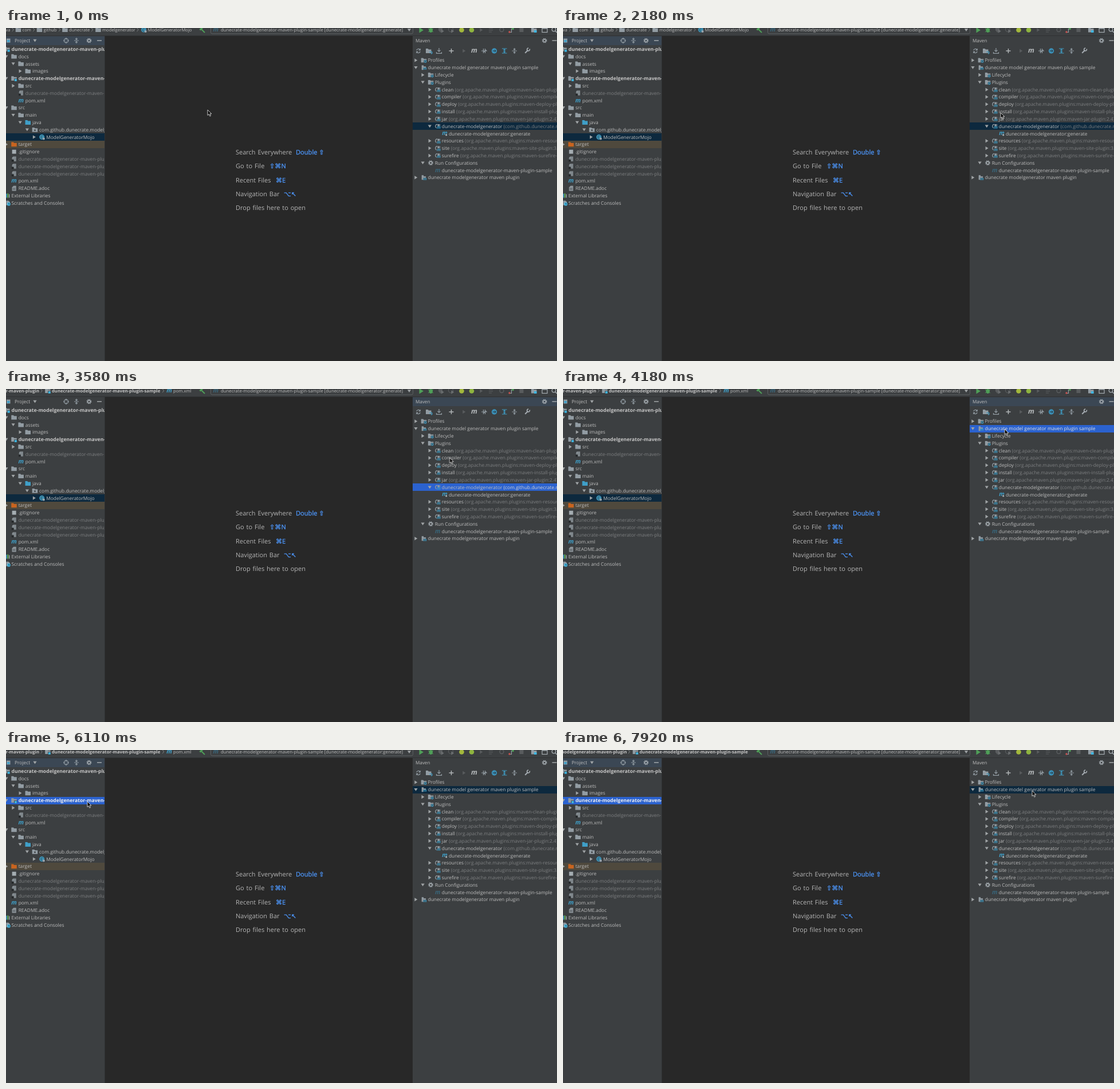
An HTML page for the animation above (8 s loop, 962 by 582 pixels).

```html
<!DOCTYPE html>
<html lang="en">
<head>
<meta charset="utf-8">
<title>IDE plugin walkthrough</title>
<style>
html, body { margin: 0; width: 100%; height: 100%; overflow: hidden; background: #282828; }
svg { display: block; width: 962px; height: 582px; }
text {
  font: 8.4px "Open Sans", "DejaVu Sans", sans-serif;
  fill: #bdbdbd; white-space: pre;
  text-rendering: geometricPrecision;
}
.b { font-weight: 700; font-size: 8.65px; fill: #c6c6c6; }
.dim { fill: #7d7f80; }
.nav { font-size: 7.65px; }
.nav.b { font-size: 7.7px; }
.hint { font-size: 11px; word-spacing: 1px; fill: #b4b4b4; }
.key { font-size: 11.1px; fill: #4d96fa; stroke: #4d96fa; stroke-width: .3px; }
.m { font-style: italic; font-weight: 700; fill: #3f9fc8; }
.lit { animation: lit 8s step-end infinite; }
.litRoot { animation: litRoot 8s step-end infinite; }
.litSample { animation: litSample 8s step-end infinite; }
#cursor { animation: move 8s step-end infinite; }
@keyframes lit {
  0%, 52.25%, 100% { fill: #7d7f80; }
  38.5% { fill: #d4d4d4; }
}
@keyframes litRoot {
  0%, 76.375%, 100% { fill: #bdbdbd; }
  52.25% { fill: #e2e2e2; }
}
@keyframes litSample {
  0%, 100% { fill: #c6c6c6; }
  76.375% { fill: #f0f0f0; }
}
@keyframes move {
  0% { transform: translate(352px, 143px); }
  1.75% { transform: translate(349px, 139px); }
  3.625% { transform: translate(510px, 162px); }
  6.625% { transform: translate(690px, 187px); }
  12.25% { transform: translate(690px, 187px); animation-timing-function: steps(7, start); }
  25.375% { transform: translate(735px, 91px); animation-timing-function: steps(2, start); }
  29.125% { transform: translate(764px, 148px); animation-timing-function: steps(4, start); }
  36.625% { transform: translate(778px, 170px); }
  42.25% { transform: translate(778px, 170px); animation-timing-function: steps(4, start); }
  50.58% { transform: translate(771px, 70px); }
  59.75% { transform: translate(771px, 70px); animation-timing-function: steps(2, start); }
  63.25% { transform: translate(245px, 95px); }
  65.25% { transform: translate(245px, 95px); animation-timing-function: steps(5, start); }
  74.46% { transform: translate(142px, 90px); }
  78.375% { transform: translate(142px, 90px); animation-timing-function: steps(3, start); }
  84.375% { transform: translate(645px, 127px); }
  86.125% { transform: translate(735px, 106px); }
  88% { transform: translate(735px, 106px); animation-timing-function: steps(4, start); }
  95.33% { transform: translate(798px, 75px); }
  99%, 100% { transform: translate(819px, 71px); }
}
</style>
</head>
<body>
<svg id="stage" viewBox="0 0 962 582"></svg>
<script>
const org = 'dunecrate';
const base = org + '-modelgenerator';
const project = base + '-maven-plugin';
const sample = project + '-sample';
const GREY = '#929ca3', BLUE = '#3f9fc8', GREEN = '#4f9f58', OFF = '#595c5e';
const DARK = '#0d293e', BRIGHT = '#2b62cf';
const PITCH = 12.81;
const NAV_Y = 3;

let css = '';
const rect = (x, y, w, h, fill, more = '') =>
  `<rect x="${x}" y="${y}" width="${w}" height="${h}" fill="${fill}" ${more}/>`;
const shape = (d, fill) => `<path d="${d}" fill="${fill}"/>`;
const line = (d, color = GREY, w = 1.2) =>
  `<path d="${d}" fill="none" stroke="${color}" stroke-width="${w}"/>`;
const dot = (x, y, r, fill) => `<circle cx="${x}" cy="${y}" r="${r}" fill="${fill}"/>`;
const ring = (x, y, r, color = GREY, w = 1.2, more = '') =>
  `<circle cx="${x}" cy="${y}" r="${r}" fill="none" stroke="${color}" stroke-width="${w}" ${more}/>`;
const text = (x, y, s, cls = '', more = '') =>
  `<text x="${x}" y="${y + 3}" class="${cls}" ${more}>${s}</text>`;

// Show content only from a to b milliseconds of the loop.
function during(a, b, content) {
  const name = `on${a}to${b}`;
  if (!css.includes(name + '{'))
    css += `@keyframes ${name}{0%{opacity:0}${a / 80}%{opacity:1}${b / 80}%{opacity:0}100%{opacity:0}}`;
  return `<g style="animation:${name} 8s step-end infinite">${content}</g>`;
}

// Icons take their left edge and vertical centre.
const folder = (x, y, c = GREY) => shape(`M${x} ${y - 3.9}h3.7l1.2 1.4h4.6v6.4h-9.5z`, c);
const icons = {
  folder,
  java: (x, y) => folder(x, y, BLUE),
  out: (x, y) => folder(x, y, '#c8641f'),
  pack: (x, y) => folder(x, y) + dot(x + 4.8, y + .9, 1.4, '#3c3f41'),
  module: (x, y) => folder(x, y) + rect(x + 4.8, y + .2, 5.2, 4.6, '#3c3f41') + rect(x + 5.6, y + 1, 4, 3.8, '#40b6e0'),
  file: (x, y) => shape(`M${x + 4} ${y - 4.5}h4.5v8.5h-7.2v-5.8z`, '#80888d') +
    shape(`M${x + 1.2} ${y - 2.4}l2.2-2.1v2.1z`, '#a5adb2') + rect(x + .6, y + .8, 3.8, 3.8, '#25282a'),
  doc: (x, y) => shape(`M${x + 4} ${y - 4.5}h4.5v9h-7.2v-6.3z`, '#8d959a') +
    line(`M${x + 2.5} ${y}h4.6m-4.6 2h4.6`, '#45494c', .8),
  m: (x, y) => text(x, y, 'm', 'm', 'style="font-size:10.5px"'),
  mDim: (x, y) => text(x, y, 'm', 'm', 'style="font-size:10.5px;fill:#396579"'),
  cls: (x, y) => dot(x + 4.8, y, 4.5, '#3d91b3') +
    text(x + 2.4, y - .2, 'C', '', 'style="font-size:7px;fill:#22353f"') +
    dot(x + 8, y + 3, 2, '#9aa7b0'),
  square: (x, y) => rect(x + 1.4, y - 3.5, 7, 7, '#a5adb2'),
  libs: (x, y) => rect(x, y - 3.5, 1.6, 7, BLUE) + rect(x + 2.3, y - 4, 1.6, 7.5, '#62b543') + rect(x + 4.6, y - 2.6, 1.6, 6.1, GREY),
  scratch: (x, y) => shape(`M${x} ${y - 4.2}h4l2.6 2.4v5.6h-6.6z`, GREY) + dot(x + 4.6, y + 1.8, 2.9, '#40b6e0') +
    line(`M${x + 4.6} ${y}v2h1.6`, '#263238', .8),
  mvn: (x, y) => shape(`M${x + 1} ${y - 4}h3.4v2h4v2.4h-4.6v3.6h-2.8z`, GREY) +
    text(x + 3.6, y + 1.2, 'm', 'm', 'style="font-size:7px"'),
  set: (x, y) => folder(x, y) + dot(x + 7.4, y + 2, 2.8, '#3c3f41') + ring(x + 7.4, y + 2, 1.7, BLUE, 1.2),
  plug: (x, y) => line(`M${x + 4} ${y - 3.4}a3.4 3.4 0 0 0-1.4 6.4`, GREY, 1.2) +
    rect(x + 4.4, y - 3.6, 3.4, 3.6, GREY) + line(`M${x + 7.8} ${y - 2.8}h1.8m-1.8 1.8h1.8`, GREY, .8) +
    text(x + 3.2, y + 1.4, 'm', 'm', 'style="font-size:7.4px"'),
  goal: (x, y) => icons.m(x, y - .6) + dot(x + 7.6, y + 2.4, 2.3, '#3c3f41') + dot(x + 7.6, y + 2.4, 1.6, '#a7b0b6'),
  gear: (x, y, c = '#a4abb0') => ring(x + 4.7, y, 3.6, c, 1.5, 'stroke-dasharray="1.6 1.23"') + ring(x + 4.7, y, 2.3, c, 1.4),
};

const tri = (x, y, open, c = '#a0a4a6') => open
  ? shape(`M${x - 3.1} ${y - 2.3}h6.2l-3.1 4.8z`, c)
  : shape(`M${x - 2.2} ${y - 3.2}v6.4l5-3.2z`, c);

const group = (clip, content) => `<g clip-path="url(#${clip})">${content}</g>`;
const bar = (x, w, y, c) => rect(x, Math.round(y - PITCH / 2), w, 13, c);
const minus = (x, y) => rect(x - 4, y - .7, 8, 1.3, '#b4b8ba');

// Row: depth, arrow (1 open, 0 closed, -1 none), icon, label, class
const tree = [
  [0, -1, 'module', project, 'b'],
  [1, 1, 'folder', 'docs'],
  [2, 1, 'folder', 'assets'],
  [3, 0, 'folder', 'images'],
  [1, 1, 'module', sample, 'b litSample'],
  [2, 0, 'folder', 'src'],
  [2, -1, 'file', sample + '.iml', 'dim'],
  [2, -1, 'm', 'pom.xml'],
  [1, 1, 'folder', 'src'],
  [2, 1, 'folder', 'main'],
  [3, 1, 'java', 'java'],
  [4, 1, 'pack', `com.github.${org}.modelgenerator`],
  [5, 0, 'cls', 'ModelGeneratorMojo'],
  [1, 0, 'out', 'target'],
  [1, -1, 'square', '.gitignore'],
  [1, -1, 'file', project + '.iml', 'dim'],
  [1, -1, 'file', project + '.ipr', 'dim'],
  [1, -1, 'file', project + '.iws', 'dim'],
  [1, -1, 'm', 'pom.xml'],
  [1, -1, 'doc', 'README.adoc'],
  [0, -1, 'libs', 'External Libraries'],
  [0, -1, 'scratch', 'Scratches and Consoles'],
];
const leftY = i => 36.9 + PITCH * i;

function leftPanel() {
  let s = rect(0, 14, 172, 568, '#3c3f41');
  const active = rect(0, 14.5, 172, 15.5, '#3b4754');
  s += during(0, 3080, active) + during(6110, 8000, active);
  s += rect(1, 18.5, 6.5, 7, GREY) + rect(2, 21, 4.5, 3.6, BLUE) + text(15, 22, 'Project') + tri(50.5, 22, true);
  s += ring(105, 22, 3.7) + line('M105 17v3.4m0 3.2v3.4M100 22h3.4m3.2 0h3.4');
  s += line('M119 22h8M123 17v3m-1.8-1.4 1.8 1.8 1.8-1.8M123 27v-3m-1.8 1.4 1.8-1.8 1.8 1.8');
  s += icons.gear(140.3, 22) + minus(163, 22);
  s += bar(0, 172, leftY(13), '#4f493d');
  s += during(0, 6110, bar(0, 172, leftY(12), DARK));
  s += during(6110, 8000, bar(0, 172, leftY(4), BRIGHT));
  tree.forEach(([depth, arrow, icon, label, cls], i) => {
    const y = leftY(i), x = 9.5 + 12.15 * depth;
    if (arrow >= 0) s += tri(x - 21.2, y, arrow);
    s += icons[icon](x - (icon === 'libs' || icon === 'scratch' ? 9.2 : 12.4), y) + text(x, y, label, cls);
  });
  return group('left', s);
}

const plugin = (name, tail = '3.1.0)') =>
  [2, 0, 'plug', name, '', `(org.apache.maven.plugins:maven-${name}-plugin:${tail}`];
const goals = [
  [0, 0, 'set', 'Profiles'],
  [0, 1, 'mvn', org + ' model generator maven plugin sample', 'litRoot'],
  [1, 0, 'set', 'Lifecycle'],
  [1, 1, 'set', 'Plugins'],
  plugin('clean'), plugin('compiler'), plugin('deploy'), plugin('install'), plugin('jar', '2.4)'),
  [2, 1, 'plug', base, '', `(com.github.${org}.modelgenerator`, 'lit'],
  [3, -1, 'goal', base + ':generate'],
  plugin('resources'), plugin('site'), plugin('surefire'),
  [1, 1, 'gear', 'Run Configurations'],
  [2, -1, 'mDim', sample],
  [0, 0, 'mvn', org + ' modelgenerator maven plugin'],
];
const rightY = i => 56.4 + PITCH * i;

function toolbar() {
  const y = 40;
  let s = line(`M716.8 ${y - 1}a3.4 3.4 0 0 1 6-1.2m.4 3.2a3.4 3.4 0 0 1-6 1.2`);
  s += shape('M723.8 35.5v3.8h-3.8zM716.2 44.5v-3.8h3.8z', GREY);
  s += folder(733, y) + line('M740 43a2 2 0 1 1 2 2', BLUE);
  s += line('M756 35v6m-2.6-2.4 2.6 2.6 2.6-2.6M751.5 42v2.4h9V42');
  s += line('M777.5 36v8m-4-4h8', '#b4b8ba', 1.4) + tri(799.5, y, false, OFF);
  s += text(812, y, 'm', 'm', 'style="font-size:12px;fill:#b4b8ba"');
  s += line('M830 40h10M833.5 36v8M836.5 36v8m-2.2-2.2 4.4-3.6');
  s += dot(852.5, y, 4.7, '#3a8fb7') + line('M849.8 40h5.4m-2-2 2 2-2 2', '#263238', 1);
  s += line('M866 36h8.5M866 44h8.5M870.2 37.5v5m-1.8-3.6 1.8-1.6 1.8 1.6m-3.6 2.2 1.8 1.6 1.8-1.6', BLUE);
  s += line('M883.5 40h8.5M887.7 35v3m-1.8-1.4 1.8 1.8 1.8-1.8M887.7 45v-3m-1.8 1.4 1.8-1.8 1.8 1.8');
  s += line('M906.3 43.8l5-5', '#a4abb0', 2) + line('M914.2 36.6a2.4 2.4 0 1 1-2-1.4', '#a4abb0', 1.7);
  return s;
}

function rightPanel() {
  let s = rect(710, 14, 252, 568, '#3c3f41');
  s += during(3080, 6110, rect(710, 14.5, 252, 15.5, '#3b4754'));
  s += text(715, 22, 'Maven', '', 'style="font-size:8.1px"') + icons.gear(935.5, 22) + minus(957.5, 22);
  s += toolbar();
  const own = rightY(9), root = rightY(1);
  s += during(0, 3080, bar(710, 252, own, DARK)) + during(3080, 4180, bar(710, 252, own, BRIGHT));
  s += during(4180, 6110, bar(710, 252, root, BRIGHT)) + during(6110, 8000, bar(710, 252, root, DARK));
  goals.forEach(([depth, arrow, icon, label, cls, tail, tailCls = 'dim'], i) => {
    const y = rightY(i), x = 736.5 + 12.15 * depth;
    if (arrow >= 0) s += tri(x - 21, y, arrow);
    s += icons[icon](x - 11.8, y);
    s += text(x, y, label + (tail ? ` <tspan class="${tailCls}">${tail}</tspan>` : ''), cls);
  });
  return group('right', s);
}

const chevron = x => line(`M${x - 1.4} ${NAV_Y - 3.2}l2.6 3.2-2.6 3.2`, '#85898b', .9);
const crumb = (x, icon, label, cls = '') =>
  icons[icon](x - 11.8, NAV_Y) + text(x, NAV_Y, label, 'nav ' + cls);
const cutCrumb = (x, label, cls = '') => text(x, NAV_Y, label, 'nav ' + cls, 'text-anchor="end"');

function topBar() {
  let s = rect(0, 0, 962, 13, '#3c3f41') + rect(0, 13, 962, 1, '#303234');
  s += during(0, 3230, cutCrumb(7.5, 'java') + [12, 48.5, 93.5, 150.5, 230].map(chevron).join('') +
    crumb(28.5, 'folder', 'com') + crumb(65.5, 'folder', 'github') + crumb(110, 'folder', org) +
    crumb(168, 'folder', 'modelgenerator') + crumb(247.5, 'cls', 'ModelGeneratorMojo'));
  s += during(3230, 6270, cutCrumb(58, project, 'b') + chevron(62) + crumb(80, 'module', sample, 'b') +
    chevron(274.5) + crumb(292, 'm', 'pom.xml'));
  s += during(6270, 8000, cutCrumb(111.5, project, 'b') + chevron(115.5) + crumb(133.5, 'module', sample, 'b'));
  s += line('M341.5 2.5l5.5 5.5', GREEN, 1.9) + line('M338.5 3.5l4.5-4', GREEN, 3);
  s += rect(357.5, -6, 353, 16, '#3c3f41', 'rx="2.5" stroke="#5c6062"');
  s += icons.mDim(361.5, NAV_Y) + text(375, NAV_Y, `${sample} [${base}:generate]`, 'nav', 'style="font-size:7.78px"');
  s += tri(704, 3.5, true);
  s += shape('M721.5-1v9.5l7.5-4.8z', GREEN);
  s += shape('M738.5 1.5q3.2-3 6.4 0v4q-3.2 5-6.4 0z', GREEN) + line('M737 1l9 6m-9 0l9-6', GREEN, .9);
  s += shape('M755 -1h7v5l-3.5 4-3.5-4z', OFF) + tri(762, 5.5, false, '#6b6e70');
  s += ring(776.5, 2.5, 4, OFF) + tri(779.5, 5.5, false, '#6b6e70');
  s += dot(795.5, 3.5, 4.3, '#a3b83c') + dot(813, 3.5, 4.3, '#8fb43f');
  s += tri(829.5, 3.5, false, OFF) + line('M843 1h7m-7 3h7m-7 3h5', OFF) + ring(865.5, 3, 3.4, OFF, 1.5);
  s += line('M879 7.5h3.5v-6h3', GREY, 1.2) + dot(885, 1.5, 1.8, GREEN) + dot(879, 7, 1.7, '#c75450');
  s += rect(896.5, 0, 7, 7, OFF);
  s += folder(917, 3.5) + rect(922, 4, 4.5, 4, '#40b6e0');
  s += rect(936, -1, 9, 8.5, 'none', 'stroke="#a4abb0" stroke-width="1.2"') + rect(936, 0, 9, 1.5, '#a4abb0');
  s += ring(956.5, 2.5, 3.3, '#a4abb0', 1.3) + line('M959 5l3 3', '#a4abb0', 1.5);
  return s;
}

const hints = [
  ['Search Everywhere', 506, 'Double ⇧'],
  ['Go to File', 460, '⇧⌘N'],
  ['Recent Files', 471, '⌘E'],
  ['Navigation Bar', 485, '⌥↖'],
  ['Drop files here to open', 0, ''],
];
const editor = hints.map(([label, x, keys], i) => {
  const y = 218 + 24.3 * i;
  return text(401, y, label, 'hint') + (keys && text(x, y, keys, 'key'));
}).join('');

const tip = during(5660, 6110,
  rect(171.5, leftY(4) - 6.4, 66.5, 12.9, '#45484a', 'stroke="#55585a" stroke-width=".6"') +
  group('tip', text(21.65, leftY(4), sample, 'b')));

const clip = (id, x, w) => `<clipPath id="${id}">${rect(x, 14, w, 568, '#000')}</clipPath>`;
const cursor = `<path id="cursor" d="M0 0v9.6l2.2-2 1.7 3.6 1.6-.7-1.6-3.5h3z"
  fill="#0a0a0a" stroke="#f0f0f0" stroke-width=".8"/>`;

document.getElementById('stage').innerHTML =
  '<defs>' + clip('left', 0, 172) + clip('right', 710, 252) + clip('tip', 172, 67) + '</defs>' +
  rect(0, 0, 962, 582, '#282828') + editor + leftPanel() + rightPanel() +
  rect(172, 14, 1, 568, '#303234') + topBar() + tip + cursor;
document.head.appendChild(document.createElement('style')).textContent = css;
</script>
</body>
</html>
```
